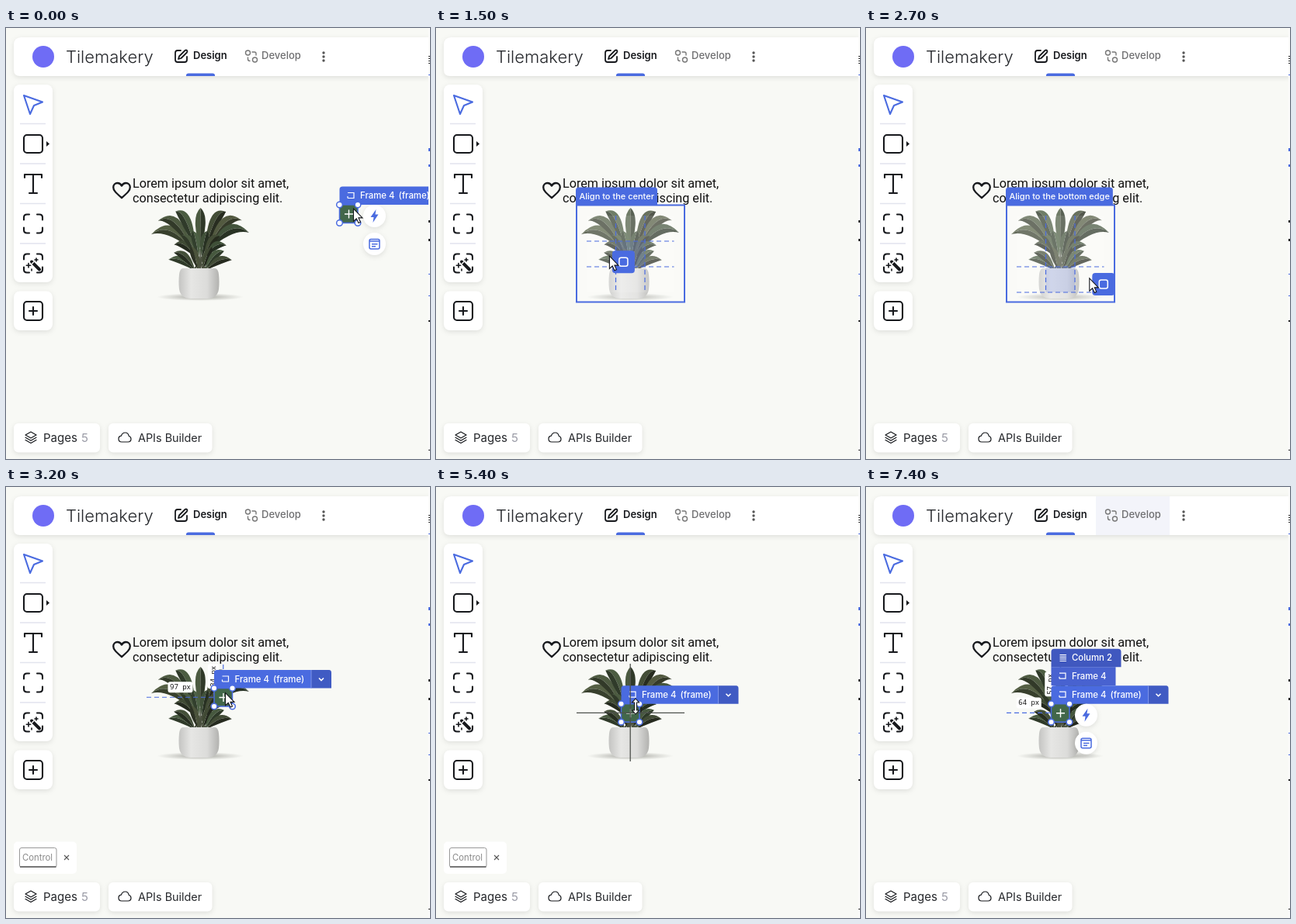
Write an HTML page that moves like this. It is 546 px wide and 556 px high and loops after 7.5 s.

```html
<!DOCTYPE html>
<html lang="en">
<head>
<meta charset="utf-8">
<title>Design editor</title>
<style>
  html, body { margin: 0; width: 100%; height: 100%; overflow: hidden; background: #f8f9f5; }
  svg { display: block; }
  text { font-family: Inter, "Open Sans", sans-serif; white-space: pre; }
  .panel { fill: #fff; filter: drop-shadow(0 2px 3px rgba(0, 0, 0, .1)); }
  .ink { fill: none; stroke: #16181c; stroke-width: 2.1; stroke-linecap: round; stroke-linejoin: round; }
  .thin { stroke-width: 1.2; }
  .blue { fill: none; stroke: #4a6be0; stroke-width: 1.5; }
  .dash { stroke-dasharray: 6 4; stroke-width: 1.2; }
  .tag { fill: #fff; font-size: 11.4px; font-weight: 500; }
  .white { fill: none; stroke: #fff; stroke-width: 1.2; }
  .body { font: 16.2px Roboto, sans-serif; fill: #111; }
  .mono { font: 9px "Noto Sans Mono", "DejaVu Sans Mono", monospace; fill: #111; text-anchor: middle; }
</style>
</head>
<body>
<svg width="546" height="556" viewBox="0 0 546 556">
  <defs>
    <linearGradient id="pot"><stop stop-color="#c4c4c2"/><stop offset=".3" stop-color="#e6e6e4"/><stop offset=".7" stop-color="#dcdcda"/><stop offset="1" stop-color="#b2b2af"/></linearGradient>
    <radialGradient id="shade"><stop stop-color="#66665f" stop-opacity=".6"/><stop offset="1" stop-color="#77776f" stop-opacity="0"/></radialGradient>
    <path id="squareIcon" class="white" d="M0 .5H8V7.5H0M0 5V7.5"/>
  </defs>
  <rect width="546" height="556" fill="#f8f9f5"/>

  <!-- Canvas content -->
  <path class="ink" style="stroke-width:1.9" transform="translate(134.6 195.2) scale(1.2)" d="M12 20C5 13.7 3 11.6 3 8.5C3 6 5 4 7.5 4C9.3 4 11 5.2 12 7C13 5.2 14.7 4 16.5 4C19 4 21 6 21 8.5C21 11.6 19 13.7 12 20Z"/>
  <text class="body" x="163" y="206">Lorem ipsum dolor sit amet,</text>
  <text class="body" x="163" y="225">consectetur adipiscing elit.</text>
  <ellipse cx="250" cy="347" rx="56" ry="5" fill="url(#shade)"/>
  <g id="plant"></g>
  <path fill="url(#pot)" d="M228 310H269Q273 310 274 318Q275 328 274 337Q272 349 260 349H238Q225 349 223 337Q222 328 223 318Q224 310 228 310Z"/>

  <!-- Alignment drop zone -->
  <g id="zone">
    <rect x="181" y="228.5" width="139" height="125" fill="#fff" opacity=".2"/>
    <rect x="194" y="242" width="112.5" height="99" fill="#fff" opacity=".1"/>
    <rect id="cell" width="37.5" height="33" fill="#4a6be0" opacity=".18"/>
    <path id="cellLines" class="blue dash"/>
    <rect class="blue" x="181" y="228.5" width="139" height="125" style="stroke-width:2"/>
    <path id="hintBox" fill="#4a6be0"/>
    <text id="hint" class="tag" x="184.5" y="221" style="font-size:11px"></text>
    <g id="ghost">
      <rect x="3" y="-7" width="29" height="29" rx="4" fill="#4a6be0"/>
      <rect class="white" x="12" y="2" width="11" height="11" rx="2.5" style="stroke-width:1.5"/>
    </g>
  </g>

  <!-- Distance guides -->
  <g id="dims">
    <path id="dimLines" class="blue dash"/>
    <g id="dimX"><rect x="-16" y="-7" width="32" height="14" rx="3" fill="#fff"/><text class="mono" y="3"></text></g>
    <g id="dimY"><rect x="-16" y="-7" width="32" height="14" rx="3" fill="#fff"/><text class="mono" y="3"></text></g>
  </g>

  <!-- Selected frame; its own top left corner is the origin -->
  <g id="frame">
    <rect class="blue" width="23.5" height="23.5" style="fill:#42674a"/>
    <path class="white" d="M6.5 12H17.5M12 6.5V17.5" style="stroke-width:1.4"/>
    <g id="parents">
      <path d="M0 -47.5V-67Q0 -71 4 -71H86Q90 -71 90 -67V-47.5Z" fill="#4058bf"/>
      <path class="white" d="M11 -63H19.5M11 -60.4H19.5M11 -57.8H19.5M11 -55.2H19.5"/>
      <text class="tag" x="26.5" y="-55.5">Column 2</text>
      <rect y="-47.5" width="83" height="24" fill="#4862d0"/>
      <use href="#squareIcon" x="10.5" y="-40"/>
      <text class="tag" x="26.5" y="-31.5">Frame 4</text>
    </g>
    <path d="M0 0V-20Q0 -23.5 4 -23.5H125V0Z" fill="#4a6be0"/>
    <path d="M125 0V-23.5H148Q151 -23.5 151 -20V0Z" fill="#405bc3"/>
    <path d="M125 -23.5V0" stroke="#7d94ea"/>
    <use href="#squareIcon" x="10.5" y="-16"/>
    <text class="tag" x="26.5" y="-7.7">Frame 4</text>
    <text class="tag" x="76" y="-7.7">(frame)</text>
    <path class="white" d="M135 -13L138 -10L141 -13" style="stroke-width:1.6"/>
    <g id="handles"></g>
    <g id="actions">
      <circle class="panel" cx="45" cy="14.5" r="14.5"/>
      <path d="M47 6L40 16H44L43 23L50 12.5H46Z" fill="#4a6be0"/>
      <circle class="panel" cx="45" cy="50.5" r="14.5"/>
      <rect class="blue" x="38.5" y="44.5" width="13" height="12.5" rx="2"/>
      <path class="blue" d="M38.5 47H51.5M41.5 50.8H49M41.5 53.8H46.500"/>
    </g>
  </g>
  <path id="cross" d="M181 291.3H320M250.2 228V354" stroke="#4d504c" stroke-width="1.3"/>

  <!-- Header -->
  <path class="panel" d="M546 12H20Q10 12 10 22V54Q10 62 18 62H546Z"/>
  <rect id="developHover" x="296" y="12" width="95" height="50" fill="#f3f4fa"/>
  <circle cx="48" cy="37" r="14" fill="#6f6cf5"/>
  <text x="77" y="45" font-size="22" font-weight="300" fill="#26282c">Tilemakery</text>
  <path class="ink" style="stroke-width:1.8" d="M225 29H221Q218 29 218 32V41Q218 44 221 44H230Q233 44 233 41V37M222 40L223 36.5L230.5 29Q232 28 233 29Q234 30 233 31.5L225.5 39Z"/>
  <text x="241" y="40" font-size="13" font-weight="600" fill="#17191d">Design</text>
  <path d="M232 62V61Q232 58.5 235 58.5H266Q269 58.5 269 61V62Z" fill="#4a6be0"/>
  <g class="ink" style="stroke:#777;stroke-width:1.4">
    <circle cx="311.5" cy="32" r="3"/><circle cx="320.5" cy="41" r="3"/>
    <path d="M317 31H320Q322 31 322 33V35M311.5 38V40Q311.5 42.5 314 42.5"/>
  </g>
  <text x="329" y="40" font-size="13" font-weight="500" fill="#6e6e70">Develop</text>
  <path class="ink" style="stroke:#555;stroke-width:3.4;stroke-dasharray:0 5" d="M409 32V42.5"/>

  <!-- Tool bar -->
  <rect class="panel" x="10" y="73" width="50" height="255" rx="8"/>
  <path d="M18 123.5H51M18 175H51M18 226.5H51M18 278H51" stroke="#e2e4ee" stroke-width="1.3"/>
  <path class="ink" style="stroke:#4a6be0" d="M23 87L47 95.5L36 100L31 111Z"/>
  <rect class="ink" x="23" y="138" width="24" height="23" rx="4"/>
  <path d="M52 146L56 149.5L52 153Z" fill="#16181c"/>
  <path class="ink" d="M24 193V189H46V193M35 189V213M30 213H40"/>
  <g id="brackets"></g>
  <path class="ink" style="stroke-width:4" d="M33 301.5L43 311.5"/>
  <path d="M33 304.5L36 301.5" stroke="#fff" stroke-width="1.3"/>
  <path class="ink" style="stroke-width:1.6" d="M29 303.5V309M26.3 306.2H31.7M39 297V301M37 299H41M33 311V313"/>
  <rect class="panel" x="10" y="339.5" width="50" height="50.5" rx="8"/>
  <rect class="ink" x="23" y="353" width="24" height="24" rx="4"/>
  <path class="ink" d="M30 365H40M35 360V370"/>

  <!-- Bottom bar -->
  <rect class="panel" x="10" y="510" width="111" height="37.5" rx="6"/>
  <path class="ink thin" d="M32 521L39 525L32 529L25 525ZM25 528.3L32 532.3L39 528.3M25 531.6L32 535.6L39 531.6"/>
  <text x="48" y="534" font-size="15" fill="#26282c">Pages</text>
  <text x="97" y="534" font-size="15" fill="#9a9ba6">5</text>
  <rect class="panel" x="132" y="510" width="133.5" height="37.5" rx="6"/>
  <path class="ink thin" d="M149 534Q145 534 145 530Q145 526.5 148.5 526.2Q149.5 522 153.5 522Q157.5 522 158.2 526.5Q161 527 161 530.3Q161 534 157 534Z"/>
  <text x="170" y="534" font-size="14.4" fill="#26282c">APIs Builder</text>

  <g id="control">
    <rect x="10" y="457.5" width="81" height="41.5" rx="5" fill="#fff"/>
    <rect x="17.5" y="465.5" width="47.5" height="25" rx="2.5" fill="#fff" stroke="#999"/>
    <path d="M18 490H64.5" stroke="#777" stroke-width="2"/>
    <text x="21" y="481.5" font-size="11.3" fill="#8b8b8b">Control</text>
    <path d="M75 475L81 481M81 475L75 481" stroke="#555" stroke-width="1.1"/>
  </g>

  <!-- Edge of the side panel -->
  <rect x="544" width="2" height="556" fill="#fbfbfa"/>
  <path d="M545 36V46" stroke="#333" stroke-width="2" stroke-dasharray="1 2"/>
  <path d="M545 248V251M545 272V275M545 377V379M545 544V545" stroke="#222" stroke-width="2"/>
  <path d="M545 60V61M545 155V159M545 176V179M545 317V318M545 345V346" stroke="#4a6be0" stroke-width="2"/>

  <g id="cursor" fill="#fff" stroke="#15171c" stroke-width="1.1">
    <path id="arrow" d="M-.5 0V16.2L3.3 12.8L6 18.5L8.5 17.4L6 11.9H11Z"/>
    <path id="resize" d="M0 -10L4.5 -5H1.5V5H4.5L0 10L-4.5 5H-1.5V-5H-4.5Z"/>
  </g>
</svg>

<script>
const LOOP = 7500, STEP = 100, SCALE = 0.895;
const $ = id => document.getElementById(id);
const show = (id, on) => { $(id).style.display = on ? '' : 'none'; };
const move = (id, [x, y], turn = 0) => $(id).setAttribute('transform', `translate(${x} ${y}) rotate(${turn})`);
const ramp = (t, from, to) => Math.max(0, Math.min(1, (t - from) / (to - from)));
const smooth = p => p * p * (3 - 2 * p);
const mix = (a, b, p) => a.map((v, i) => v + (b[i] - v) * p);
const add = ([x, y], dx, dy) => [x + dx, y + dy];

let seed = 7;
const random = () => (seed = seed * 16807 % 2147483647) / 2147483647;

// A drooping leaf: a light and a dark half on both sides of the midrib.
function leaf(base, bend, tip, width) {
  const [dx, dy] = [tip[0] - base[0], tip[1] - base[1]];
  const len = Math.hypot(dx, dy), side = dx < 0 ? 1 : -1;
  const light = 20 + random() * 9, hue = 75 + random() * 30;
  const half = (sign, l) => {
    const edge = add(bend, -dy / len * width * sign, dx / len * width * sign);
    return `<path fill="hsl(${hue} 17% ${l}%)" d="M${base}Q${edge} ${tip}Q${bend} ${base}Z"/>`;
  };
  return `<path fill="none" stroke="#4b5140" stroke-width="1.6" d="M250 311Q250 298 ${base}"/>` +
    half(side, light + 4) + half(-side, light - 7);
}

// Leaf tips lie on the upper half of an ellipse.
function fan(count, cy, rx, ry, width) {
  let out = '';
  for (let i = 0; i < count; i++) {
    const a = (i / (count - 1) - 0.5) * 2.95 + (random() - 0.5) * 0.2;
    const sx = Math.sin(a), tip = [250 + rx * sx, cy - ry * Math.cos(a)];
    const base = [250 + rx * sx * 0.2, cy + ry * 0.55];
    const bend = [250 + rx * sx * 0.62, tip[1] + 12 - 30 * Math.abs(sx) * ry / 34];
    out += leaf(base, bend, tip, width);
  }
  return out;
}
$('plant').innerHTML = fan(7, 266, 63, 34, 13) + fan(6, 283, 34, 22, 10) + fan(6, 301, 41, 20, 10);

const corners = y => [[1, 1], [-1, 1], [1, -1], [-1, -1]].map(([sx, sy]) =>
  `<path class="ink" vector-effect="non-scaling-stroke" transform="translate(35 ${y}) scale(${sx} ${sy})" d="M-12 -5V-8Q-12 -12 -8 -12H-5"/>`).join('');
$('brackets').innerHTML = corners(252.5) + corners(303.5);
$('handles').innerHTML = [0, 1, 2, 3].map(i =>
  `<circle class="blue" cx="${i % 2 * 23.5}" cy="${(i >> 1) * 23.5}" r="3.8" style="fill:#fff"/>`).join('');

// Straight drag towards the plant.
const approach = t => mix([448, 233], [272, 283], ramp(t, 600, 1000));

// Sweep around the plant, from its left side below the pot and up to the right.
function sweep(t) {
  const a = Math.PI - 3.96 * ramp(t, 1900, 3000) ** 1.5;
  return [255 + 43 * Math.cos(a), 297 + 41 * Math.sin(a)];
}

function framePlace(t) {
  if (t < 1000) return add(approach(t - STEP), -18.5, -5);
  const lift = 26 * Math.sin(Math.PI * ramp(t, 3200, 4100));
  const drift = mix([268, 259.5], [264, 247], ramp(t, 3200, 4200));
  return mix(add(drift, 0, -lift), [238.5, 279.7], smooth(ramp(t, 4200, 4700)));
}

function pointer(t) {
  if (t < 1000) return approach(t);
  if (t < 3200) return mix(approach(t), sweep(t), smooth(ramp(t, 1000, 1700)));
  const held = mix(add(framePlace(t), 15, 6), [257, 283], ramp(t, 4700, 5000));
  return mix(held, [388, 28], smooth(ramp(t, 6600, 7300)));
}

function hintText(col, row) {
  const side = ['left', '', 'right'][col], level = ['top', '', 'bottom'][row];
  if (side && level) return `Align to the ${level} ${side} corner`;
  return side || level ? `Align to the ${side || level} edge` : 'Align to the center';
}

function drawZone([x, y]) {
  const third = (v, start, size) => Math.max(0, Math.min(2, Math.floor((v - start) / size)));
  const col = third(x, 194, 37.5), row = third(y, 242, 33);
  const left = 194 + col * 37.5, top = 242 + row * 33;
  $('cell').setAttribute('x', left);
  $('cell').setAttribute('y', top);
  $('cellLines').setAttribute('d',
    `M${left} 242V341M${left + 37.5} 242V341M194 ${top}H306.5M194 ${top + 33}H306.5`);
  $('hint').textContent = hintText(col, row);
  const right = 188.5 + $('hint').getComputedTextLength();
  $('hintBox').setAttribute('d', `M180 229V209Q180 205.5 184 205.5H${right - 4}Q${right} 205.5 ${right} 209V229Z`);
}

function drawDims([x, y]) {
  const midX = x + 11.75, midY = y + 11.75;
  $('dimLines').setAttribute('d', `M181 ${midY}H${x}M${midX} 229V${y}`);
  move('dimX', [(181 + x) / 2, midY - 13]);
  move('dimY', [midX - 13, (229 + y) / 2], -90);
  $('dimX').lastChild.textContent = `${Math.round((x - 181) / SCALE)} px`;
  $('dimY').lastChild.textContent = `${Math.round((y - 229) / SCALE)} px`;
}

function draw(t) {
  const during = (a, b) => t >= a && t < b;
  const aligning = during(1000, 3200), measuring = during(3200, 4700) || t >= 6700;
  const resizing = during(5200, 6100);
  const hand = pointer(t), place = framePlace(t);

  show('frame', !aligning);
  move('frame', place);
  show('actions', t < 600 || t >= 6700);
  show('parents', t >= 6700);
  show('zone', aligning);
  if (aligning) drawZone(pointer(t - 2 * STEP));
  move('ghost', hand);
  show('dims', measuring);
  if (measuring) drawDims(place);
  show('cross', during(4700, 6000));
  show('control', during(3200, 6000));
  show('developHover', t >= 7200);

  move('cursor', hand);
  show('cursor', t < 7400);
  show('resize', resizing);
  show('arrow', !resizing);
}

const begin = performance.now();
function tick() {
  const t = (performance.now() - begin) % LOOP;
  draw(Math.floor(t / STEP) * STEP);
  requestAnimationFrame(tick);
}
tick();
</script>
</body>
</html>
```
